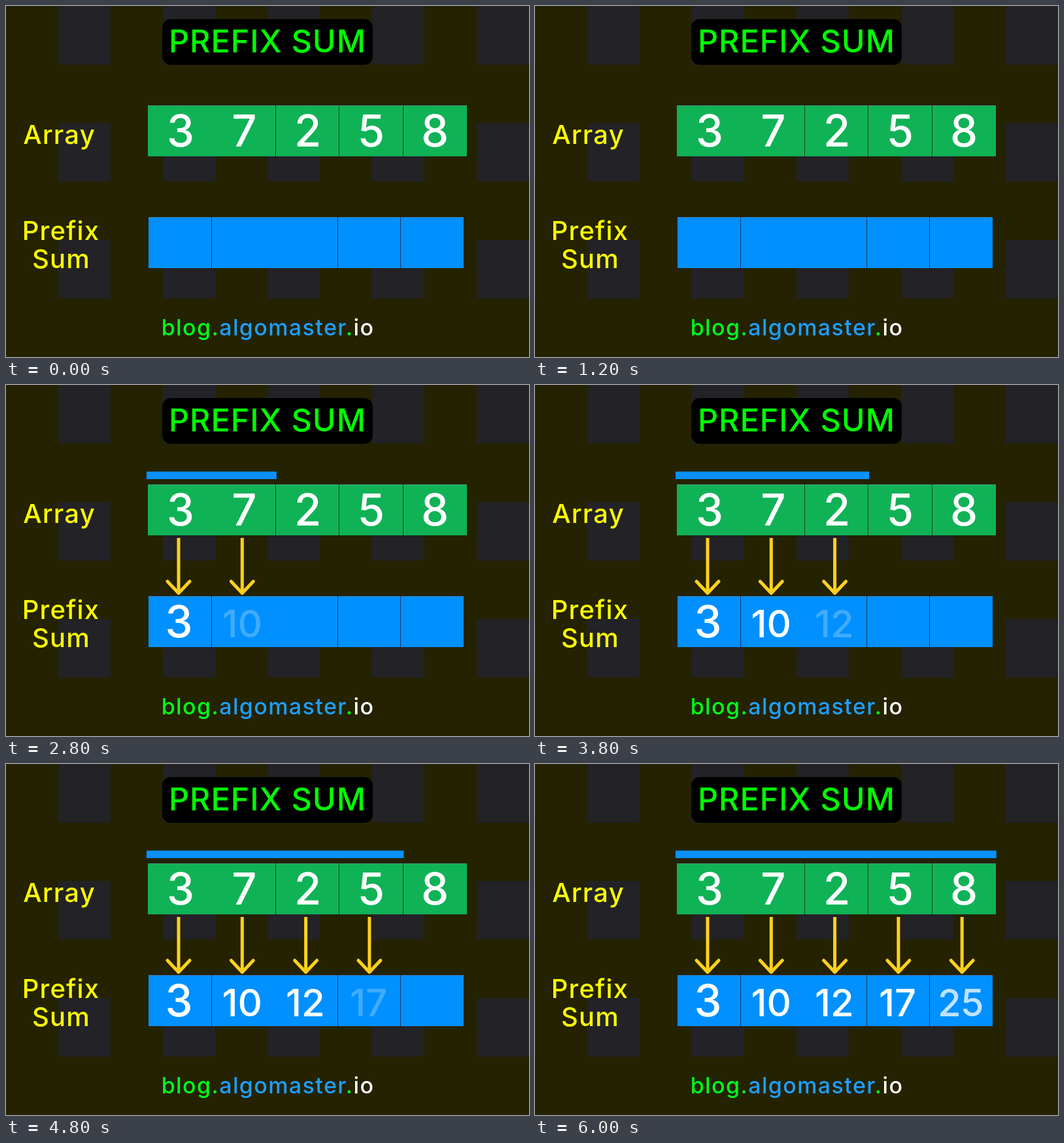
Recreate the animation shown at these times as an HTML page. Size 800 by 537 pixels, loop 6200 ms.

```html
<!DOCTYPE html>
<html lang="en">
<head>
<meta charset="utf-8">
<title>Prefix Sum</title>
<style>
  html, body { margin: 0; width: 100%; height: 100%; overflow: hidden; background: #242200; }
  svg { display: block; width: 800px; height: 537px; font-family: Inter, "Open Sans", sans-serif; font-weight: 500; }
  text { text-anchor: middle; }
  .title { fill: #00ff00; font-size: 48.5px; letter-spacing: 1px; }
  .label { fill: #fbff00; font-size: 40px; letter-spacing: 1.2px; }
  .digit { fill: #fff; }
  .arrow { fill: none; stroke: #ffd11c; stroke-width: 5; }
  .head { stroke-linecap: round; stroke-linejoin: round; }
  .url { font-size: 34px; letter-spacing: 1.4px; }
</style>
</head>
<body>
<svg viewBox="0 0 800 537">
  <defs id="defs"></defs>
  <g id="tiles"></g>
  <rect x="239" y="20" width="322" height="70" rx="13"/>
  <text class="title" x="400" y="70.5">PREFIX SUM</text>

  <text class="label" x="81.5" y="211">Array</text>
  <text class="label" x="84" y="358">Prefix</text>
  <text class="label" x="84.5" y="400.5">Sum</text>

  <g id="cells"></g>
  <rect id="bar" x="215" y="132.5" height="11.5" fill="#0a90ff"/>
  <g id="marks"></g>

  <text class="url" x="400.5" y="504"><tspan fill="#00ff1a">blog.</tspan><tspan fill="#1e9fff">algomaster</tspan><tspan fill="#00ff1a">.</tspan><tspan fill="#fff">io</tspan></text>
</svg>
<script>
const $ = id => document.getElementById(id);
const LOOP = 6200, TICK = 200, FIRST = 1200, STEP = 1000;
const VALUES = [3, 7, 2, 5, 8], PITCH = 97.3, BAR_X = 215;

function add(parent, tag, attrs, text) {
  const el = document.createElementNS("http://www.w3.org/2000/svg", tag);
  for (const k in attrs) el.setAttribute(k, attrs[k]);
  if (text !== undefined) el.textContent = text;
  parent.appendChild(el);
  return el;
}
const box = (parent, x, y, width, height, fill) =>
  add(parent, "rect", { x, y, width, height, fill });

const digit = (parent, x, y, value) =>
  add(parent, "text", { class: "digit", x, y, "font-size": value < 10 ? 67 : 58 }, value);

// Faint tiles on every second column and row
for (let row = 0; row < 6; row += 2)
  for (let col = 1; col < 10; col += 2)
    box($("tiles"), col * 80, row * 89.5, 80, 89.5, "#232226");

// A strip of five cells; the seam numbered "joined" has no line
function strip(x, y, width, fill, edge, line, joined) {
  box($("cells"), x, y, width, 78, fill);
  box($("cells"), x, y, width, 1, edge);
  VALUES.forEach((_, i) => {
    if (i && i !== joined)
      box($("cells"), Math.floor(x + i * width / VALUES.length), y, 1, 78, line);
  });
}
strip(217, 152, 488, "#10b256", "#3f9a80", "#0d4a1c", 1);
strip(218, 323, 482, "#0090ff", "#3b86c8", "#15385a", 2);

let sum = 0;
const steps = VALUES.map((value, i) => {
  sum += value;
  const x = 264 + i * PITCH;
  digit($("cells"), x + 3, 215, value);

  const clip = add($("defs"), "clipPath", { id: "wipe" + i });
  const mask = box(clip, x - 30, 230, 60, 0);
  const arrow = add($("marks"), "g", { class: "arrow", "clip-path": `url(#wipe${i})` });
  add(arrow, "path", { d: `M${x} 234V318` });
  add(arrow, "path", { class: "head", d: `M${x - 17} 300.5l17 18l17 -18` });

  return { mask, end: 316.5 + i * PITCH, label: digit($("marks"), 264.5 + i * 96.7, 385.5, sum) };
});

const ramp = (t, from, to) => Math.min(1, Math.max(0, (t - from) / (to - from)));

function draw(now) {
  const t = Math.floor((now % LOOP) / TICK) * TICK;
  let right = BAR_X;
  steps.forEach((s, i) => {
    const u = t - FIRST - i * STEP;
    right += (s.end - right) * ramp(u, 0, 300);
    s.mask.setAttribute("height", 95 * ramp(u, 250, 550));
    s.label.setAttribute("opacity", ramp(u, 500, 900));
  });
  $("bar").setAttribute("width", right - BAR_X);
}

function loop() {
  draw(performance.now());
  requestAnimationFrame(loop);
}
loop();
</script>
</body>
</html>
```
